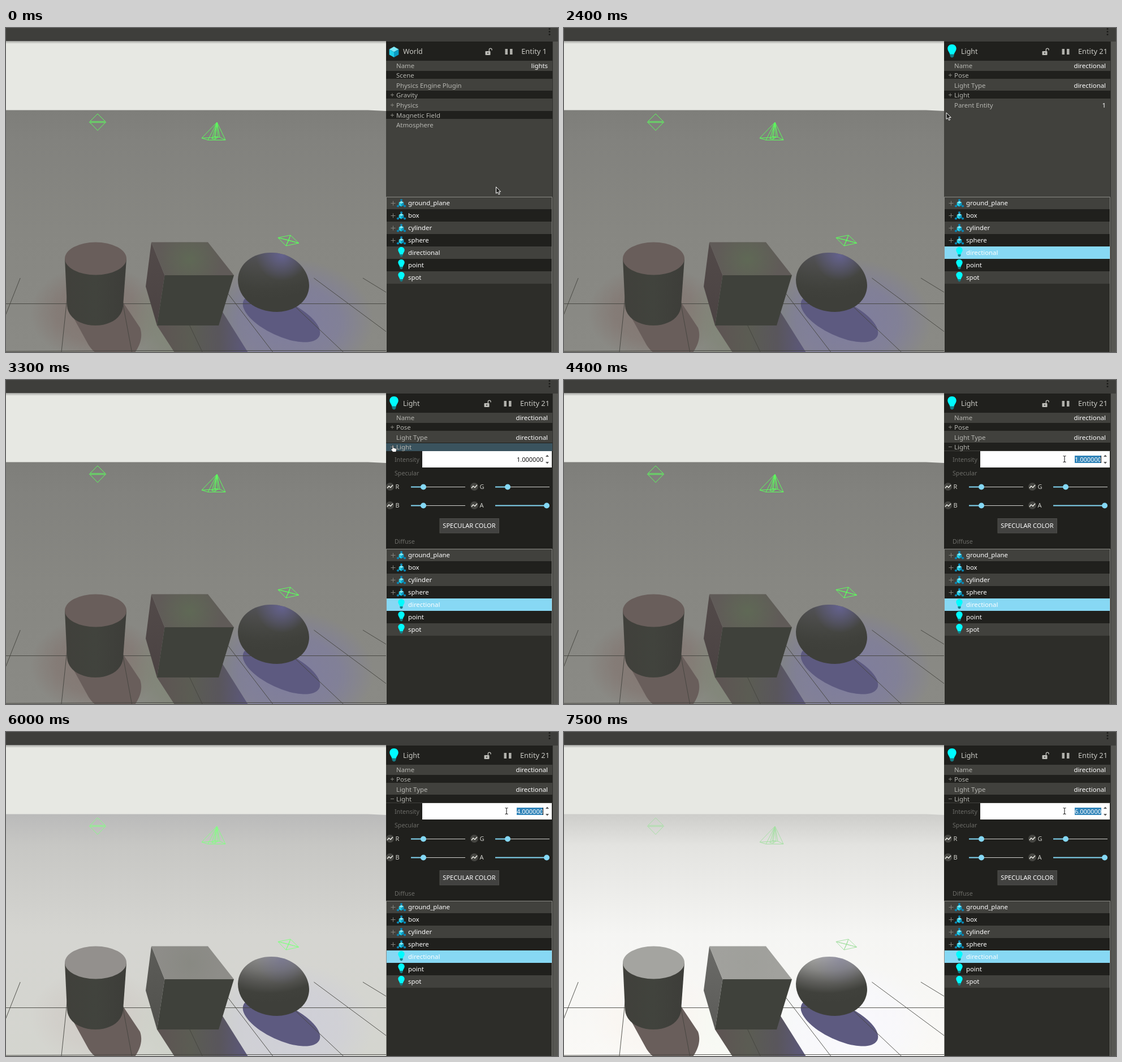
Recreate the animation shown at these times as an HTML page. Size 976 by 574 pixels, loop 8 s.

```html
<!DOCTYPE html>
<html lang="en">
<head>
<meta charset="utf-8">
<title>Light inspector</title>
<style>
html, body { margin: 0; width: 100%; height: 100%; overflow: hidden; background: #2d2d29; }
svg { display: block; width: 100vw; height: 100vh; }
text { font-family: "Noto Sans", "Open Sans", sans-serif; white-space: pre; }
</style>
</head>
<body>
<svg id="stage" viewBox="0 0 976 574" preserveAspectRatio="none"></svg>
<script>
const LOOP = 8000;
const LIGHT = '#41413d', DARK = '#20201d', LABEL = '#b6b6b1', BLUE = '#84d8f5';

const text = (x, y, s, size = 11.4, fill = '#fff', anchor = 'start') =>
  `<text x="${x}" y="${y}" font-size="${size}" fill="${fill}" text-anchor="${anchor}">${s}</text>`;
const rect = (x, y, w, h, fill, more = '') =>
  `<rect x="${x}" y="${y}" width="${w}" height="${h}" fill="${fill}" ${more}/>`;
const path = (d, fill, more = '') => `<path d="${d}" fill="${fill}" ${more}/>`;
const line = (d, color, w = 1, more = '') =>
  `<path d="${d}" fill="none" stroke="${color}" stroke-width="${w}" ${more}/>`;
const circle = (x, y, r, fill) => `<circle cx="${x}" cy="${y}" r="${r}" fill="${fill}"/>`;
const ellipse = (x, y, rx, ry, fill, turn = 0) =>
  `<ellipse rx="${rx}" ry="${ry}" fill="${fill}" transform="translate(${x} ${y}) rotate(${turn})"/>`;
const plus = (x, y, r = 3.5, both = true) =>
  line(`M${x - r} ${y}h${2 * r}` + (both ? `M${x} ${y - r}v${2 * r}` : ''), '#85857f');
const stops = list => list.map(([o, c, a = 1]) =>
  `<stop offset="${o}" stop-color="${c}" stop-opacity="${a}"/>`).join('');
const linear = (id, [x1, y1, x2, y2], list) =>
  `<linearGradient id="${id}" gradientUnits="userSpaceOnUse" x1="${x1}" y1="${y1}" x2="${x2}" y2="${y2}">${stops(list)}</linearGradient>`;
const radial = (id, x, y, r, list) =>
  `<radialGradient id="${id}" gradientUnits="userSpaceOnUse" cx="${x}" cy="${y}" r="${r}">${stops(list)}</radialGradient>`;
const glow = (id, color, a) =>
  `<radialGradient id="${id}">${stops([[0, color, a], [.6, color, .7 * a], [1, color, 0]])}</radialGradient>`;

// 3D view, one palette per light intensity
const looks = [
  { ground: ['#7e7e7a', '#82827e', '#878782', '#8a8a85'], red: '#82746f', moss: '#7f8575', blue: '#7d7ba2', glow: .9,
    top: '#695e5b', boxTop: '#605b58', left: ['#524a49', '#4b4343'], ball: ['#53535a', '#4c4c4b', '#454642'],
    shine: .75, wire: '#5cff5c', tint: .8 },
  { ground: ['#bababa', '#c7c7c4', '#d5d5d1', '#d4d5cf'], red: '#cfcac5', moss: '#ccd0c6', blue: '#cdcdda', glow: .8,
    top: '#93908d', boxTop: '#8e8d89', left: ['#5c5c58', '#51514d'], ball: ['#8d8d8c', '#747472', '#565653'],
    shine: .4, wire: '#84ff84', tint: .12 },
  { ground: ['#cdcdca', '#e3e3e0', '#f5f5f3', '#faf9f6'], red: '#faf5f0', moss: '#f6faf2', blue: '#f8f8ff', glow: .8,
    top: '#a4a4a0', boxTop: '#a1a19d', left: ['#6a6a67', '#5c5c59'], ball: ['#a6a6a4', '#878785', '#5f5f5c'],
    shine: .3, wire: '#a6e0a4', tint: .03 }
];

// Floor lines run to one vanishing point
function floorLines() {
  const vx = 143, vy = 145;
  let d = 'M0 488.500H672M0 573L250 571.500H672';
  for (let k = -1; k < 7; k++) {
    const slope = (k * 99.600 - 36) / 343;
    d += `M${vx + slope * 298} ${vy + 298}L${vx + slope * 430} ${vy + 430}`;
  }
  return d;
}

function scene(p) {
  const g = p.ground;
  const defs = linear('ground', [0, 145, 0, 574], [[0, g[0]], [.13, g[1]], [.5, g[2]], [1, g[3]]])
    + glow('red', p.red, p.glow) + glow('green', p.moss, p.glow) + glow('blue', p.blue, p.glow)
    + linear('body', [104, 0, 213, 0], [[0, '#40403b'], [.5, '#41433d'], [1, '#3d3d39']])
    + radial('lid', 160, 408, 48, [[0, '#755d59', p.tint], [1, '#6a5f5b', 0]])
    + radial('moss', 325, 410, 58, [[0, '#5f6c55', p.tint], [1, '#5f6c55', 0]])
    + linear('side', [255, 385, 262, 520], [[0, p.left[0]], [1, p.left[1]]])
    + radial('ball', 465, 290, 190, [[.57, p.ball[0]], [.7, p.ball[1]], [.81, p.ball[2]], [.91, '#40413c'], [1, '#3e3f3a']])
    + radial('shine', 488, 402, 46, [[0, '#6a67a0', p.shine], [1, '#6a67a0', 0]])
    + linear('boxShade', [275, 0, 425, 0], [[0, '#5d5553'], [.35, '#5b5c53'], [.68, '#59565c'], [1, '#5c587b']]);

  const wires = 'M162 152L176.500 166.500 162 181.500 147.500 166.500ZM148 165.500H176M147.500 167.500H176.500'
    + 'M373 167L346 195 357 198.500 388 198.500ZM346 195L378 193.500 388 198.500M373 167L357 198.500M373 167L378 193.500'
    + 'M373 167L364 196 370 197 375 193 368 192.500 364 196M373 167L368 193M373 167L370 197M373 167L375 193'
    + 'M481 371.500L503 367 517.500 381 495 386ZM481 371.500L517.500 381M481 371.500L500 376 495 386M503 367L495 386M503 367L500 376 517.500 381';

  return `<defs>${defs}</defs>`
    + path('M0 145.500H640L672 147V574H0Z', 'url(#ground)')
    + ellipse(160, 505, 118, 85, 'url(#red)') + ellipse(325, 520, 115, 95, 'url(#green)')
    + ellipse(500, 520, 150, 112, 'url(#blue)')
    + path('M111 498L144 558Q150 570 164 580H224C236 566 243 548 237 531L207 486Z', '#695e5b')
    + path('M267 527L300 578H430L381 500Z', 'url(#boxShade)')
    + ellipse(487, 514.5, 74, 31, '#5d5a80', 25)
    + line(floorLines(), '#45453f', .9)
    // cylinder
    + path('M104 409L108 493C110 513 131 527 158 527S205 513 207 493L213 409Z', 'url(#body)')
    + [p.top, 'url(#lid)'].map(f => ellipse(158.5, 408.5, 54.5, 29, f)).join('')
    // box
    + path('M257 379.500L280.500 438 267 527 247 458Z', 'url(#side)')
    + [p.boxTop, 'url(#moss)'].map(f => path('M257 379.500H357L403 438H280.500Z', f)).join('')
    + path('M280.500 438H403L376 527H267Z', '#3f413b')
    // sphere
    + ['url(#ball)', 'url(#shine)'].map(f =>
      path('M410 446C411 417 437 398 469 398C506 398 536 425 536 457C535 486 508 503 479 503C440 503 410 478 410 446Z', f)).join('')
    + line(wires, p.wire);
}

// Icons
function cube(x, y, r) {
  const w = r * .88, h = r / 2;
  return path(`M${x} ${y - r}l${w} ${h} ${-w} ${h} ${-w} ${-h}Z`, '#7ceafa')
    + path(`M${x - w} ${y - h}L${x} ${y}v${r}l${-w} ${-h}Z`, '#20cfe9')
    + path(`M${x + w} ${y - h}L${x} ${y}v${r}l${w} ${-h}Z`, '#0b9cc4');
}
const model = (x, y) =>
  [[0, -5.5], [-6, 5], [6, 5]].map(([dx, dy]) => circle(x + dx, y + dy, 2.1, '#0a86b4')).join('')
  + cube(x, y + 1, 5);
const bulb = (x, y, k = 1) => `<g transform="translate(${x} ${y}) scale(${k})">`
  + path('M0 -8.500C3.500 -8.500 5.700 -6 5.700 -3C5.700 0 3 2 2.600 5H-2.600C-3 2 -5.700 0 -5.700 -3C-5.700 -6 -3.500 -8.500 0 -8.500Z', '#00fbff')
  + path('M-2.500 4.500H2.500V7L1 8.700H-1L-2.500 7Z', '#157f88') + '</g>';
const lock = x => rect(x, 41, 9, 7, '#bdbdb8', 'rx="1"') + circle(x + 4.5, 44.5, 1.1, DARK)
  + line(`M${x + 6.800} 41V38.500a2.400 2.400 0 0 1 4.800 0V39.500`, '#bdbdb8', 1.3);
const pause = x => rect(x, 37, 4.5, 10, '#b0b0ab') + rect(x + 8.5, 37, 4.5, 10, '#b0b0ab');
const chart = (x, y) => circle(x, y, 7, '#454541')
  + line(`M${x - 5} ${y + 2.500}l3 -3.500 3 2.500 4 -4.500`, '#f0f0ea', 1.4);

// Panels
const header = (title, entity, x, end) =>
  rect(672, 24, 294, 34, DARK) + text(702, 46, title, 12.4, '#c9c9c4') + lock(x - 35) + pause(x)
  + text(end, 46, entity, 12.8, '#c9c9c4', 'end');
const rowY = i => Math.round(58.6 + i * 17.6);
const row = (i, label, value = '', expand = false) =>
  (i % 2 ? rect(672, rowY(i), 294, 14, DARK) : '')
  + (expand ? plus(683, rowY(i) + 7.5, 3) : '')
  + text(690, rowY(i) + 11.5, label, 11.4, LABEL) + text(958, rowY(i) + 11.5, value, 11.4, '#fff', 'end');

const worldPanel = header('World', 'Entity 1', 882.5, 956) + cube(686, 42.5, 9.5)
  + ['Name', 'Scene', 'Physics Engine Plugin', 'Gravity', 'Physics', 'Magnetic Field', 'Atmosphere']
    .map((s, i) => row(i, s, i ? '' : 'lights', i > 2 && i < 6)).join('');

const slider = (x, y, name, v) => chart(x, y) + text(x + 9.5, y + 4, name, 11, '#d0d0cb')
  + line(`M${x + 37} ${y + .5}h96`, '#d0d0cc', 1) + line(`M${x + 37} ${y + .5}h${v}`, BLUE, 2) + circle(x + 37 + v, y + .5, 5, BLUE);
const details = rect(672, 126, 294, 174, DARK)
  + text(687, 145, 'Intensity', 10.7, '#6c6c68') + rect(736, 126, 229, 29, '#fff')
  + path('M954 136h6l-3 -3.500Z', '#555') + path('M954 145h6l-3 3.500Z', '#555')
  + rect(903, 134, 47, 13, '#2f83b8', 'id="mark"')
  + '<text id="value" x="950" y="145" font-size="11" text-anchor="end"></text>'
  + rect(949, 134, 1, 13, '#111', 'id="caret"')
  + text(687, 169, 'Specular', 10.7, '#6c6c68')
  + slider(679, 189, 'R', 22) + slider(828, 189, 'G', 22) + slider(679, 222, 'B', 22) + slider(828, 222, 'A', 91)
  + rect(767, 245.5, 104.5, 25.5, '#424240', 'stroke="#4e4e4b"')
  + text(819, 262, 'SPECULAR COLOR', 11.1, '#fff', 'middle')
  + text(687, 290, 'Diffuse', 10.7, '#6c6c68');

const lightPanel = header('Light', 'Entity 21', 880.5, 961) + bulb(686, 40.5, 1.35)
  + row(0, 'Name', 'directional') + row(1, 'Pose', '', true) + row(2, 'Light Type', 'directional')
  + rect(672, rowY(3), 294, 14, DARK) + rect(672, 112, 294, 14, '#3a535e', 'id="hover"')
  + plus(683, 118.5, 3, false) + line('M683 115.500v6', '#85857f', 1, 'id="stem"')
  + text(690, 122.5, 'Light', 11.4, LABEL)
  + `<g id="parent">${row(4, 'Parent Entity', '1')}</g>`
  + `<g id="details" clip-path="url(#fold)">${details}</g>`;

const names = ['ground_plane', 'box', 'cylinder', 'sphere', 'directional', 'point', 'spot'];
const tree = rect(672, 299, 294, 275, '#2d2d29') + names.map((s, i) => {
  const y = 299 + i * 22;
  return rect(672, y, 294, 22, i % 2 ? DARK : LIGHT)
    + (i === 4 ? rect(672, y, 294, 22, '#87d8f4', 'id="picked"') : '')
    + (i < 4 ? plus(684.5, y + 11.5, 4) + model(699, y + 11.5) : bulb(699, y + 9.5))
    + text(711, y + 15, s, 11.35);
}).join('') + line('M672.500 574V299.500H965.500V574', '#8b8b86');

const cursors = {
  arrow: path('M0 0V11.500L2.700 9.200 4.600 13.400 6.600 12.600 4.800 8.500H8.200Z', '#20201e', 'stroke="#fff" stroke-width="1" stroke-linejoin="round"'),
  hand: path('M3 8V2Q4 .5 5 2V6L10 7.500Q11 8 10.500 10L9.500 13.500H4L.8 9.500Q1 7.500 3 8Z', '#fff', 'stroke="#222" stroke-width=".8"'),
  beam: line('M-2.500 .5Q0 .5 0 2V10Q0 11.500 -2.500 11.500M2.500 .5Q0 .5 0 2V10Q0 11.500 2.500 11.500', '#222', 1.1)
};

document.getElementById('stage').innerHTML =
  `<defs><clipPath id="fold">${rect(672, 126, 295, 174, '#000', 'id="foldRect"')}</clipPath>`
  + linear('shade', [0, 23, 0, 28], [[0, '#000', .3], [1, '#000', 0]]) + '</defs>'
  + rect(0, 0, 976, 574, '#3e3e3b') + rect(0, 23, 672, 124, '#e7e8e3')
  + '<g id="scene"></g>' + rect(0, 23, 672, 5, 'url(#shade)')
  + rect(672, 24, 294, 276, LIGHT)
  + `<g id="world">${worldPanel}</g><g id="light">${lightPanel}</g>` + tree
  + rect(966, 24, 10, 550, '#565652') + rect(966, 24, 1, 550, '#30302d')
  + [1.5, 6.5, 11.5].map(y => circle(961, y, 1.5, '#1c1c1a')).join('')
  + `<g id="tip">${rect(784.5, 365.5, 85.5, 23.5, '#5a5a57', 'stroke="#686865"') + text(796, 381, 'Entity Id: 21', 11.35)}</g>`
  + `<g id="cursor">${Object.keys(cursors).map(k => `<g id="${k}">${cursors[k]}</g>`).join('')}</g>`;

const $ = id => document.getElementById(id);
const show = (id, on) => $(id).setAttribute('display', on ? 'inline' : 'none');

// The pointer was sampled in 100 ms steps: time, x, y, shape
const pointer = [
  [0, 866.5, 281.5, 'arrow'], [600, 826, 318, 'arrow'], [700, 781.5, 357.5, 'arrow'],
  [900, 772, 371, 'arrow'], [1000, 757, 390, 'arrow'], [1100, 747.5, 401.5, 'arrow'],
  [1900, 733, 366, 'arrow'], [2000, 707, 290, 'arrow'], [2100, 690.5, 238.5, 'arrow'],
  [2300, 682, 198, 'arrow'], [2400, 676, 150, 'arrow'], [2500, 736, 114, 'hand'],
  [2800, 680, 114, 'hand'], [3600, 708, 114, 'hand'], [3700, 758, 126, 'beam'],
  [3800, 826, 129, 'beam'], [3900, 869, 131, 'beam'], [4100, 885, 134, 'beam']
];
const digits = [[0, 1], [5100, 2], [5400, 3], [5600, 4], [6800, 5], [7000, 6]];
const blinks = [4400, 4900, 5600, 6200, 6700, 7300];
const at = (list, t) => list.filter(k => k[0] <= t).pop();

let level = -1;
function render(t) {
  const look = t < 6000 ? 0 : t < 7500 ? 1 : 2;
  if (look !== level) $('scene').innerHTML = scene(looks[level = look]);

  const selected = t >= 1600, open = t < 3200 ? 0 : t < 3300 ? .5 : 1;
  show('world', !selected);
  show('light', selected);
  show('picked', t >= 1500);
  show('tip', t >= 1400 && t < 1900);
  show('hover', t >= 2500 && t < 3700);
  show('stem', !open);
  show('details', open > 0);
  $('foldRect').setAttribute('height', 174 * open);
  $('parent').setAttribute('transform', `translate(0 ${174 * open})`);

  const focus = t >= 4400;
  show('mark', focus);
  show('caret', blinks.filter(b => b <= t).length % 2);
  $('value').textContent = at(digits, t)[1].toFixed(6);
  $('value').setAttribute('fill', focus ? '#fff' : '#111');

  const [, x, y, shape] = at(pointer, t);
  $('cursor').setAttribute('transform', `translate(${x} ${y})`);
  for (const k in cursors) show(k, k === shape);
}

const start = performance.now();
function tick() {
  render((performance.now() - start) % LOOP);
  requestAnimationFrame(tick);
}
tick();
</script>
</body>
</html>
```
